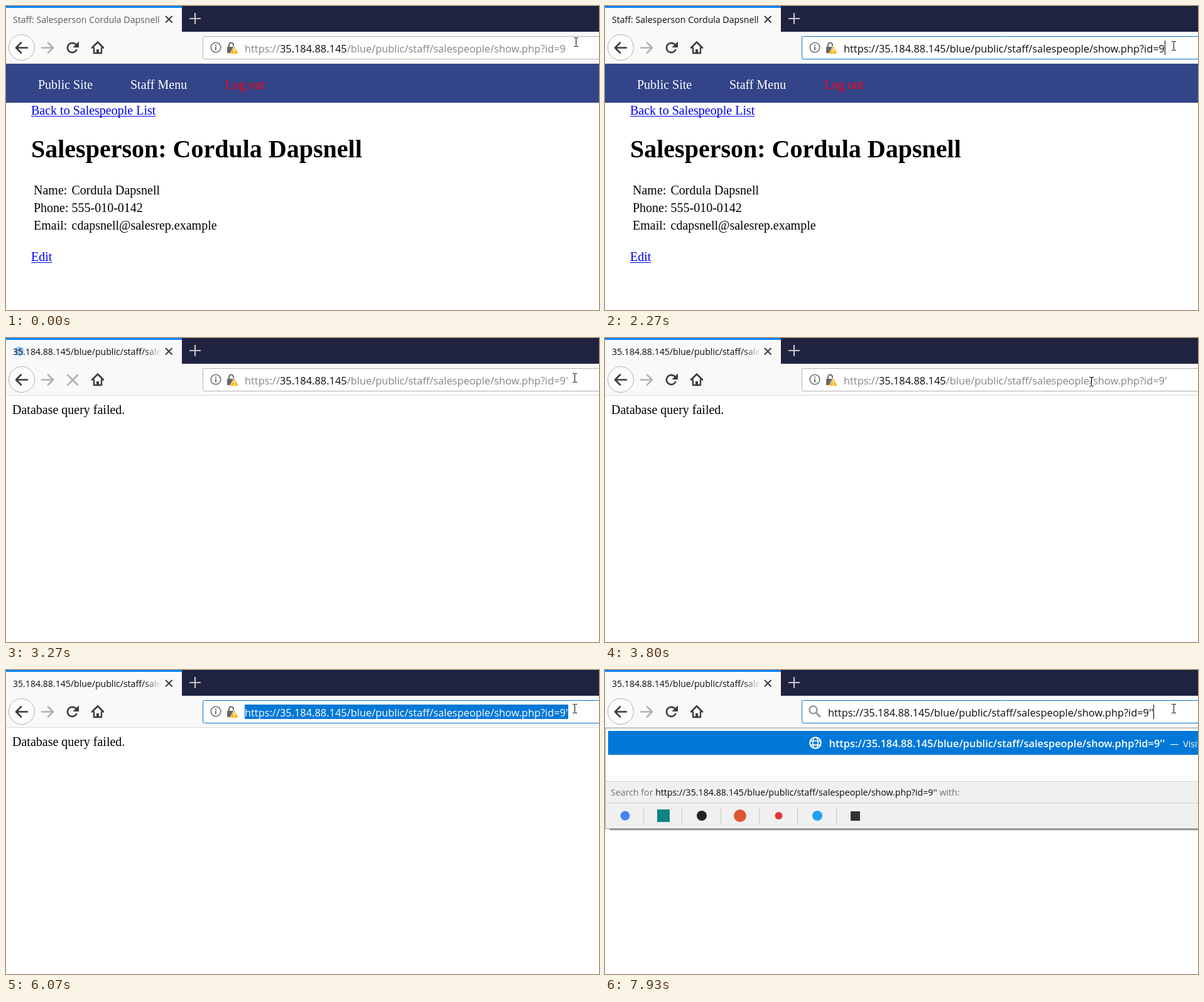
Write an HTML page with a canvas that moves like this. It is 944 px wide and 484 px high and loops after 8000 ms.

```html
<!DOCTYPE html>
<html lang="en">
<head>
<meta charset="utf-8">
<title>Quote in the address bar</title>
<style>
html, body { margin: 0; width: 100%; height: 100%; overflow: hidden; background: #fff; }
canvas { display: block; }
</style>
</head>
<body>
<canvas id="stage" width="944" height="484"></canvas>
<script>
const ctx = document.getElementById('stage').getContext('2d');
const W = 944, H = 484, LOOP = 8000, FRAME = 200 / 3;
const UI = '"Open Sans", "Noto Sans", sans-serif';
const SERIF = '"Liberation Serif", "Times New Roman", serif';
const BIG = `16.4px ${UI}`, SMALL = `14.2px ${UI}`;
const BLUE = '#0078d7', INK = '#3b3b3d';

const PERSON = 'Cordula Dapsnell';
const TITLE = 'Staff: Salesperson ' + PERSON;
const HOST = '35.184.88.145';
const PATH = '/blue/public/staff/salespeople/show.php?id=9';

// Pointer track: time, x, y
const TRACK = [
  [0, 907, 57], [133, 905, 63], [3560, 905, 63], [3900, 720, 72],
  [4200, 430, 92], [4400, 220, 100], [4600, 55, 110], [4800, 0, 122],
  [4950, 70, 188], [5100, 330, 175], [5270, 733, 88], [5500, 850, 68],
  [5870, 905, 61], [8000, 905, 61]
];

function rect(x, y, w, h, color) {
  ctx.fillStyle = color;
  ctx.fillRect(x, y, w, h);
}

// Draws text and returns the x where it ends
function text(str, x, y, font, color) {
  ctx.font = font;
  ctx.fillStyle = color;
  ctx.fillText(str, x, y);
  return x + ctx.measureText(str).width;
}

function lines(color, width, ...paths) {
  ctx.strokeStyle = color;
  ctx.lineWidth = width;
  ctx.beginPath();
  for (const p of paths) {
    ctx.moveTo(p[0], p[1]);
    for (let i = 2; i < p.length; i += 2) ctx.lineTo(p[i], p[i + 1]);
  }
  ctx.stroke();
}

function shape(points, fill) {
  ctx.beginPath();
  for (let i = 0; i < points.length; i += 2) ctx.lineTo(points[i], points[i + 1]);
  ctx.closePath();
  ctx.fillStyle = fill;
  ctx.fill();
}

function circle(x, y, r, fill, stroke, width = 1) {
  ctx.beginPath();
  ctx.arc(x, y, r, 0, Math.PI * 2);
  if (fill) { ctx.fillStyle = fill; ctx.fill(); }
  if (stroke) { ctx.strokeStyle = stroke; ctx.lineWidth = width; ctx.stroke(); }
}

function link(str, x, y) {
  const end = text(str, x, y, `20px ${SERIF}`, '#0000ee');
  rect(x, y + 2, end - x, 1, '#0000ee');
}

function drawProfile() {
  const font = `20px ${SERIF}`;
  rect(0, 92, W, 62, '#334488');
  text('Public Site', 51, 132, font, '#fff');
  text('Staff Menu', 198, 132, font, '#fff');
  text('Log out', 349, 132, font, '#ff0018');
  link('Back to Salespeople List', 40, 173);
  text('Salesperson: ' + PERSON, 40, 241, `bold 40px ${SERIF}`, '#000');
  const rows = [['Name:', PERSON], ['Phone:', '555-010-0142'], ['Email:', 'cdapsnell@salesrep.example']];
  rows.forEach(([label, value], i) => {
    text(label, 44, 300 + 28 * i, font, '#000');
    text(value, 104.5, 300 + 28 * i, font, '#000');
  });
  link('Edit', 40, 406);
}

function drawTab(t) {
  rect(0, 0, W, 41, '#202340');
  rect(0, 0, 280, 41, '#f9f9fa');
  rect(0, 0, 280, 3, '#0a84ff');

  const loading = t >= 3000 && t < 3200;
  if (loading) circle(19 + 5 * Math.sin((t - 3000) / 110), 21, 3, '#9a9a9c');

  const p = (t - 3255) / 375;
  if (p > 0 && p < 1) {
    const ease = 1 - Math.pow(1 - p, 1.7);
    ctx.save();
    ctx.beginPath();
    ctx.rect(0, 3, 280, 38);
    ctx.clip();
    ctx.globalAlpha = 0.4 * (1 - ease);
    circle(21, 21, 2.5 * (1 + 39 * ease), '#0a84ff');
    ctx.restore();
  }

  const changed = t >= 3200;
  let color = t < 530 ? '#5c5c60' : '#0c0c0d';
  if (changed || loading) {
    const fade = ctx.createLinearGradient(220, 0, 247, 0);
    fade.addColorStop(0, color);
    fade.addColorStop(1, 'rgba(12,12,13,0)');
    color = fade;
  }
  text(changed ? HOST + PATH : TITLE, loading ? 33 : 11, 27, `14.1px ${UI}`, color);
  lines('#3a3a3c', 2, [254, 16, 264.5, 26.5], [264.5, 16, 254, 26.5]);
  lines('#c3c4cd', 2.2, [292, 20, 310, 20], [301, 11, 301, 29]);
}

function drawButtons(stop) {
  circle(25, 66, 20.5, '#fdfdfd', '#b0b0b2');
  ctx.lineCap = ctx.lineJoin = 'round';
  lines(INK, 2.6, [17, 66.5, 34, 66.5], [24, 58.5, 16, 66.5, 24, 74.5]);
  lines('#b1b1b3', 2.6, [57, 66.5, 74, 66.5], [67, 58.5, 75, 66.5, 67, 74.5]);
  if (stop) {
    lines('#b1b1b3', 2.6, [98.5, 59, 114, 74.5], [114, 59, 98.5, 74.5]);
  } else {
    ctx.beginPath();
    ctx.arc(105.5, 66.5, 7.6, 0.5, Math.PI * 2 - 0.65);
    ctx.strokeStyle = INK;
    ctx.lineWidth = 2.6;
    ctx.stroke();
    shape([116, 56.5, 116, 66, 106.5, 66], INK);
  }
  lines(INK, 2.6, [137, 66.5, 146, 57.5, 155, 66.5]);
  lines(INK, 2.4, [140, 66.5, 140, 75, 152, 75, 152, 66.5]);
  rect(144, 69, 4, 6, INK);
  ctx.lineCap = 'butt';
  ctx.lineJoin = 'miter';
}

function drawSiteIcons() {
  circle(334, 66, 7.8, null, '#6c6c6f', 1.6);
  rect(333, 61.5, 2, 2, '#6c6c6f');
  rect(333, 65, 2, 5.5, '#6c6c6f');

  rect(352, 65, 11, 10, '#68686b');
  ctx.beginPath();
  ctx.moveTo(355, 66);
  ctx.lineTo(355, 62);
  ctx.arc(358.5, 62, 3.5, Math.PI, 0);
  ctx.lineTo(362, 64);
  ctx.strokeStyle = '#68686b';
  ctx.lineWidth = 2;
  ctx.stroke();
  shape([363.5, 62.5, 370.5, 76.5, 356, 76.5], '#fff');
  shape([363.5, 64, 369.5, 76, 357, 76], '#ffb71b');
  rect(362.7, 67.5, 1.6, 4.5, '#fff');
  rect(362.7, 73, 1.6, 1.6, '#fff');
}

function drawAddress(s) {
  ctx.beginPath();
  ctx.roundRect(313.5, 48.5, 700, 36, 2);
  ctx.fillStyle = '#fff';
  ctx.fill();
  ctx.strokeStyle = s.focused ? '#0a74c8' : '#b4b4b6';
  ctx.lineWidth = 1;
  ctx.stroke();

  const url = 'https://' + HOST + PATH + s.quotes;
  let x = 380, end;
  if (s.typing) {
    x = 355;
    circle(331.5, 63.5, 6, null, '#97979a', 2.4);
    lines('#97979a', 3, [336, 68, 343, 75]);
  } else {
    drawSiteIcons();
  }
  if (!s.focused) {
    end = text('https://', x, 74, BIG, '#858587');
    end = text(HOST, end, 74, BIG, '#0c0c0d');
    text(PATH + s.quotes, end, 74, BIG, '#858587');
    return;
  }
  if (s.selected) {
    ctx.font = BIG;
    rect(x, 55, Math.round(ctx.measureText(url).width), 23, BLUE);
  }
  end = text(url, x, 74, BIG, s.selected ? '#fff' : '#0c0c0d');
  if (s.caret) rect(Math.round(end), 55, 1, 23, '#000');
}

function globe(x, y, color) {
  circle(x, y, 8.8, null, color, 2);
  ctx.lineWidth = 1.6;
  ctx.beginPath();
  ctx.ellipse(x, y, 4.2, 8.8, 0, 0, Math.PI * 2);
  ctx.stroke();
  lines(color, 1.6, [x - 8, y - 3, x + 8, y - 3], [x - 8, y + 3.4, x + 8, y + 3.4]);
}

function drawEngines() {
  for (let i = 0; i < 6; i++) rect(61 + Math.round(61.35 * i), 219, 1, 27, '#c8c8c8');
  circle(32, 232, 7.5, '#4285f4');
  rect(83, 222, 20, 20, '#0f8285');
  circle(154, 232, 8, '#222');
  circle(215, 232, 10, '#de5833');
  circle(276.5, 232, 6, '#e53238');
  circle(338, 232, 8, '#1da1f2');
  rect(391, 225, 15, 15, '#333');
}

function drawPopup(s) {
  const url = 'https://' + HOST + PATH + s.quotes;
  const extra = s.tall ? 45 : 0;
  ['#7d7d7d', '#b0b0b0', '#e2e2e2'].forEach((c, i) => rect(7 + i, 253 + extra + i, W, 1, c));
  rect(0, 92, W, 161 + extra, '#a3a3a3');
  rect(1, 93, W, 159 + extra, '#fff');

  rect(5, 97, W, 38, BLUE);
  globe(335, 116, '#fff');
  let end = text(url, 356.5, 123, `600 16.4px ${UI}`, '#fff');
  text('—', end + 8, 123, SMALL, '#fff');
  text('Visit', end + 29, 123, SMALL, '#fff');

  if (s.history) {
    globe(335, 153, '#6b6b6e');
    end = text(TITLE, 356, 161, BIG, '#0c0c0d');
    text('—', end + 7, 161, SMALL, '#77777a');
    text('https://' + HOST + PATH, end + 28, 161, SMALL, '#1673d0');
  }

  ctx.save();
  ctx.translate(0, extra);
  rect(1, 177, W, 75, '#f0f0f0');
  rect(1, 177, W, 1, '#d2d2d2');
  rect(1, 211, W, 1, '#d2d2d2');
  end = text('Search for ', 9, 200, SMALL, '#737376');
  end = text(url, end, 200, SMALL, '#0c0c0d');
  text(' with:', end, 200, SMALL, '#737376');
  drawEngines();
  ctx.restore();
}

function pointerAt(t) {
  let i = 0;
  while (i < TRACK.length - 2 && t >= TRACK[i + 1][0]) i++;
  const [t0, x0, y0] = TRACK[i], [t1, x1, y1] = TRACK[i + 1];
  const k = Math.min(1, (t - t0) / (t1 - t0));
  return [Math.round(x0 + (x1 - x0) * k), Math.round(y0 + (y1 - y0) * k)];
}

function drawPointer(t) {
  const [x, y] = pointerAt(t);
  ctx.save();
  ctx.translate(x, y);
  if (x > 313 && y > 48 && y < 85) {
    rect(0, -6, 1, 13, '#000');
    for (const v of [-7, 7]) {
      rect(-3, v, 3, 1, '#000');
      rect(1, v, 3, 1, '#000');
    }
  } else {
    shape([0.5, 0.5, 0.5, 16.5, 4.2, 13, 7, 18.8, 9.4, 17.7, 6.8, 12, 11.6, 12], '#fff');
    ctx.strokeStyle = '#000';
    ctx.lineWidth = 1;
    ctx.stroke();
  }
  ctx.restore();
}

function stateAt(t) {
  const within = (a, b) => t >= a && t < b;
  const first = within(2460, 3000), second = t >= 7660;
  return {
    quotes: second ? "''" : t >= 2460 ? "'" : '',
    typing: first || second,
    tall: within(2460, 2530),
    history: first || within(7660, 7930),
    focused: within(530, 3000) || t >= 5930,
    selected: within(800, 1460) || within(6060, 6800),
    caret: within(530, 800) || within(1460, 1730) || within(2260, 2860) ||
      within(5930, 6060) || within(6800, 7000) || t >= 7460
  };
}

function draw(t) {
  const s = stateAt(t);
  rect(0, 0, W, H, '#fff');
  if (t < 3200) drawProfile();
  else text('Database query failed.', 10, 121, `20px ${SERIF}`, '#000');
  rect(0, 41, W, 51, '#f9f9fa');
  rect(0, 91, W, 1, '#dcdcde');
  drawTab(t);
  drawButtons(t >= 3000 && t < 3530);
  drawAddress(s);
  if (s.typing) drawPopup(s);
  drawPointer(t);
}

const start = performance.now();
function tick() {
  const t = (performance.now() - start) % LOOP;
  draw(Math.floor((t + 4) / FRAME) % 120 * FRAME + 0.01);
  requestAnimationFrame(tick);
}
tick();
</script>
</body>
</html>
```
